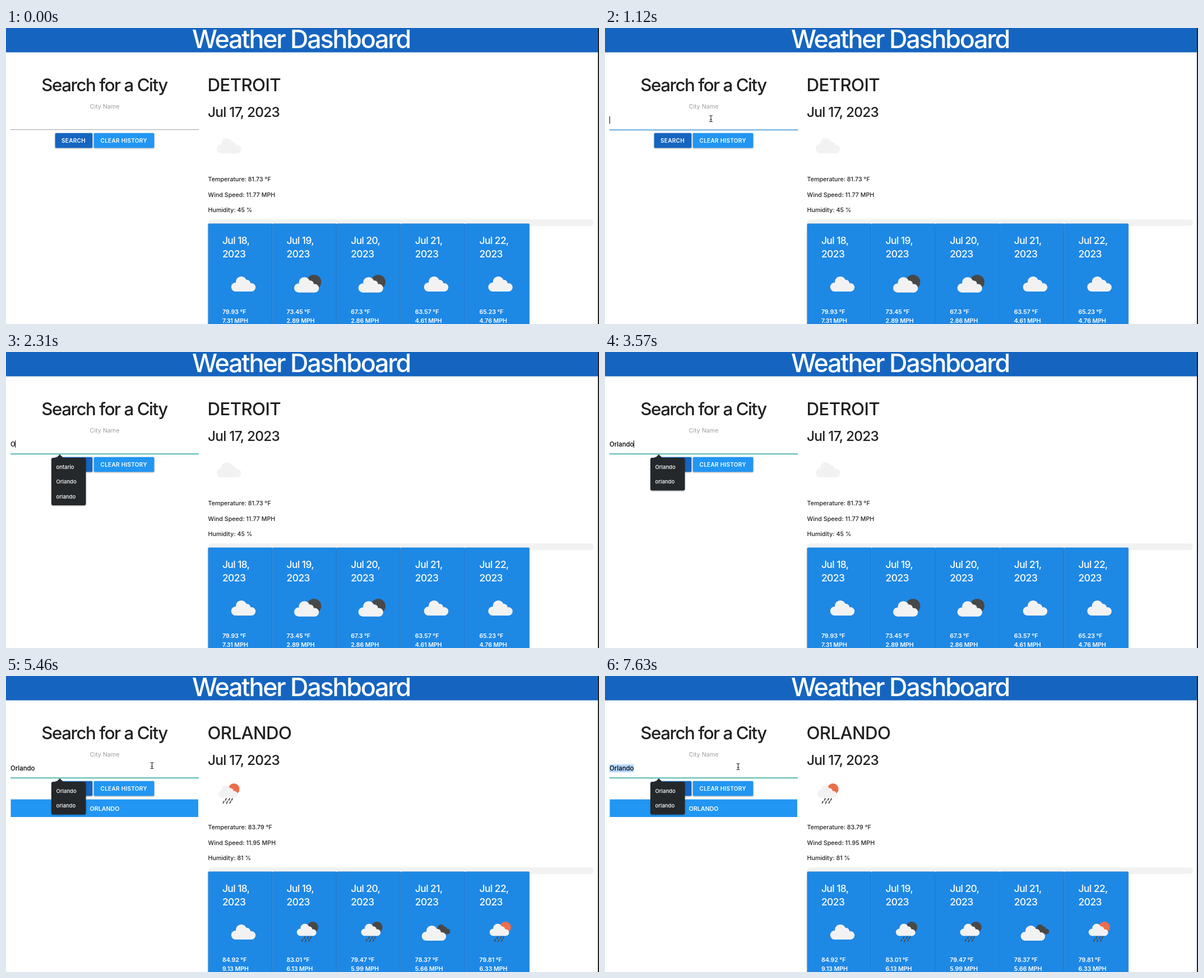
Write an HTML page that moves like this. It is 1058x529 px and loops after 8 s.

```html
<!DOCTYPE html>
<html lang="en">
<head>
<meta charset="utf-8">
<title>Weather Dashboard</title>
<style>
html, body { margin: 0; width: 100%; height: 100%; overflow: hidden; background: #fff; }
svg { display: block; width: 100vw; height: 100vh; }
text { font: 450 10.7px Inter, sans-serif; font-optical-sizing: none; fill: #212121; white-space: pre; }
.brand { font-size: 45px; letter-spacing: -2.3px; fill: #fff; }
.h3 { font-size: 31.3px; letter-spacing: -1.5px; }
.city { font-size: 31.3px; letter-spacing: -.65px; }
.h4 { font-size: 24.5px; letter-spacing: -.8px; }
.h5 { font-size: 17.55px; letter-spacing: -.62px; fill: #fff; }
.value { font-weight: 600; letter-spacing: -.1px; fill: #fff; }
.btn { font-size: 10px; font-weight: 600; letter-spacing: .3px; fill: #fff; }
.history { font-weight: 600; fill: #fff; }
.label { font-weight: 400; fill: #9e9e9e; }
.input { font-size: 11.4px; fill: #000; }
.option { font-size: 9.5px; font-weight: 500; fill: #fff; }
.mid { text-anchor: middle; }
.raised { filter: drop-shadow(0 1px 1.2px rgba(0, 0, 0, .35)); }
</style>
</head>
<body>
<svg id="stage" viewBox="0 0 1058 529">
  <defs>
    <g id="cloud">
      <circle cx="-14" cy="5" r="8"/><circle cx="-4" cy="-4.3" r="9.7"/>
      <circle cx="6" cy="-1.5" r="6.5"/><circle cx="14" cy="5.5" r="7.5"/>
      <rect x="-14" y="0" width="28" height="13"/>
    </g>
    <path id="rain" d="M-5 8l-1.5 3M1 8l-1.5 3M6 8l-1.5 3M-9 13l-1.5 3M-3 13l-1.5 4M3 13l-1.5 3"
      fill="none" stroke="#484848" stroke-width="1.8" stroke-linecap="round"/>
  </defs>
  <rect width="1058" height="529" fill="#fff"/>
  <rect width="1057" height="43.5" fill="#1565c0"/>
  <rect x="1056" width="2" height="529" fill="#222"/>
  <text class="brand mid" x="526.5" y="36">Weather Dashboard</text>

  <text class="h3 mid" x="175.5" y="113">Search for a City</text>
  <text class="label mid" x="176" y="144">City Name</text>
  <rect id="selection" x="8" y="158" height="14" fill="#b3d7ff"/>
  <text id="query" class="input" x="8" y="169"></text>
  <rect id="caret" y="158" width="1" height="13" fill="#000"/>
  <rect id="underline" x="8" width="336"/>
  <rect class="raised" x="87.7" y="187.7" width="66.6" height="26.6" rx="1.5" fill="#1565c0"/>
  <text class="btn" x="99" y="205.2">SEARCH</text>
  <rect class="raised" x="156.8" y="187.7" width="107.6" height="26.6" rx="1.5" fill="#2196f3"/>
  <text class="btn" x="168.5" y="205.2">CLEAR HISTORY</text>
  <g id="history">
    <rect x="8.5" y="220.5" width="334.5" height="31.5" fill="#2196f3"/>
    <text class="history mid" x="176" y="240.5">ORLANDO</text>
  </g>
  <g id="menu">
    <g class="raised" fill="#25282b">
      <path d="M89 190L96 183L103 190Z"/>
      <rect id="menuBox" x="81" y="189" width="61.5" rx="3"/>
    </g>
    <g id="options"></g>
  </g>

  <rect x="361" y="342" width="688" height="12" rx="6" fill="#f2f2f2"/>
  <g id="forecasts"></g>

  <path id="beam" d="M-2.5 -5.5Q0 -5.5 0 -4Q0 -5.5 2.5 -5.5M0 -4V4M-2.5 5.5Q0 5.5 0 4Q0 5.5 2.5 5.5M-1.2 1.5H1.2"
    fill="none" stroke="#222" stroke-width="1.1" stroke-linecap="round"/>
  <path id="arrow" d="M0 0V12L2.8 9.4L4.6 13.6L6.6 12.7L4.8 8.7H8.6Z" fill="#000" stroke="#fff" stroke-width=".9"/>
</svg>
<script>
const LOOP = 8000;
const $ = id => document.getElementById(id);
const show = (el, on) => el.style.display = on ? '' : 'none';
const text = (cls, x, y, s) => `<text class="${cls}" x="${x}" y="${y}">${s}</text>`;

const places = [
  { city: 'DETROIT', icon: 'cloudy', now: ['81.73', '11.77', '45'], days: [
    ['cloudy', '79.93', '7.31'], ['moonCloud', '73.45', '2.89'], ['moonCloud', '67.3', '2.86'],
    ['cloudy', '63.57', '4.61'], ['cloudy', '65.23', '4.76']] },
  { city: 'ORLANDO', icon: 'sunRain', now: ['83.79', '11.95', '81'], days: [
    ['cloudy', '84.92', '9.13'], ['moonRain', '83.01', '6.13'], ['moonRain', '79.47', '5.99'],
    ['overcast', '78.37', '5.66'], ['sunRain', '79.81', '6.33']] }
];

const cloud = (x, y, scale = 1, fill = '#f2f2f2') =>
  `<use href="#cloud" fill="${fill}" transform="translate(${x} ${y}) scale(${scale})"/>`;
const disc = (x, y, r, fill) => `<circle cx="${x}" cy="${y}" r="${r}" fill="${fill}"/>`;
const shower = fill => disc(8.7, -9, 10, fill) + cloud(-2, -4, .8) + '<use href="#rain"/>';
const icons = {
  cloudy: cloud(0, 0),
  moonCloud: disc(11, -4, 13, '#484848') + cloud(-2, 1.5, 1.02),
  overcast: cloud(11, -5, .64, '#484848') + cloud(-4, 2),
  moonRain: shower('#484848'),
  sunRain: shower('#ec6e4c')
};
const icon = (name, x, y) => `<g transform="translate(${x} ${y})">${icons[name]}</g>`;

function card([name, temp, wind], i) {
  const x = 360.6 + i * 114.65;
  return `<rect class="raised" x="${x}" y="349.5" width="114.65" height="200" rx="1.5" fill="#1e88e5"/>`
    + text('h5', x + 25.3, 386, `Jul ${18 + i},`) + text('h5', x + 25.3, 409.5, '2023')
    + icon(name, x + 63.2, 458)
    + text('value', x + 25.3, 511, temp + ' °F') + text('value', x + 25.3, 527, wind + ' MPH');
}

$('forecasts').innerHTML = places.map(p => '<g>'
  + text('city', 359.5, 113, p.city) + text('h4', 360, 159, 'Jul 17, 2023')
  + icon(p.icon, 398, 211)
  + text('', 360.5, 274, `Temperature: ${p.now[0]} °F`)
  + text('', 360.5, 302, `Wind Speed: ${p.now[1]} MPH`)
  + text('', 360.5, 329.3, `Humidity: ${p.now[2]} %`)
  + p.days.map(card).join('') + '</g>').join('');
$('options').innerHTML = ['ontario', 'Orlando', 'orlando']
  .map(s => text('option', 89.5, 0, s)).join('');

// Each table holds [start ms, value] steps.
const typed = [2310, 2590, 2730, 2940, 3080, 3220, 3570].map((at, i) => [at, 'Orlando'.slice(0, i + 1)]);
const query = [[0, ''], ...typed];
const caretOn = [[0, 0], [1050, 1], [1540, 0], [2100, 1], [4130, 0], [4690, 1], [5180, 0],
  [5740, 1], [6230, 0], [6440, 1], [6650, 0]];
const lineColor = [[0, '#9e9e9e'], [1050, '#7fb0d6'], [1120, '#3f93d0'], [2310, '#26a69a']];
const place = [[0, 0], [4760, 1]];
const pointer = [[0, ''], [70, 'arrow'], [490, 'beam'], [2310, ''], [5180, 'beam']];
// Pointer path: [ms, x, y]
const path = [[70, 560, 310], [210, 430, 250], [350, 300, 200], [490, 215, 172], [630, 192, 165],
  [910, 192, 165], [980, 190, 158], [1050, 189, 152], [1120, 189, 162], [2310, 189, 162],
  [5180, 283, 156], [5460, 260.5, 160], [5950, 256, 159], [6020, 257, 159], [6230, 250, 161],
  [6440, 248, 161], [6720, 237.5, 162]];

const step = (table, t) => table.filter(row => row[0] <= t).pop()[1];

function pointAt(t) {
  const next = path.findIndex(p => p[0] > t);
  if (next === 0) return path[0].slice(1);
  if (next < 0) return path[path.length - 1].slice(1);
  const [a, b] = [path[next - 1], path[next]];
  const k = (t - a[0]) / (b[0] - a[0]);
  return [a[1] + (b[1] - a[1]) * k, a[2] + (b[2] - a[2]) * k];
}

function draw(ms) {
  const t = Math.floor(ms % LOOP / 70) * 70;
  const word = step(query, t);
  $('query').textContent = word;
  const width = word ? $('query').getComputedTextLength() : 0;
  $('caret').setAttribute('x', 8 + width - (word ? .5 : 0));
  show($('caret'), step(caretOn, t));
  $('selection').setAttribute('width', width);
  show($('selection'), t >= 6650);

  const focused = t >= 1050;
  $('underline').setAttribute('fill', step(lineColor, t));
  $('underline').setAttribute('y', focused ? 181.5 : 181.2);
  $('underline').setAttribute('height', focused ? 1.5 : 1);

  show($('history'), t >= 3920);
  show($('menu'), word);
  const skip = word.length > 1 ? 1 : 0;
  $('menuBox').setAttribute('height', 85 - 26.4 * skip);
  [...$('options').children].forEach((el, i) => {
    show(el, i >= skip);
    el.setAttribute('y', 209 + 26.4 * (i - skip));
  });
  [...$('forecasts').children].forEach((el, i) => show(el, i === step(place, t)));

  const shape = step(pointer, t);
  const [x, y] = pointAt(t);
  for (const id of ['arrow', 'beam']) {
    show($(id), shape === id);
    $(id).setAttribute('transform', `translate(${x} ${y})`);
  }
}

const start = performance.now();
function tick() {
  draw(performance.now() - start);
  requestAnimationFrame(tick);
}
tick();
</script>
</body>
</html>
```
